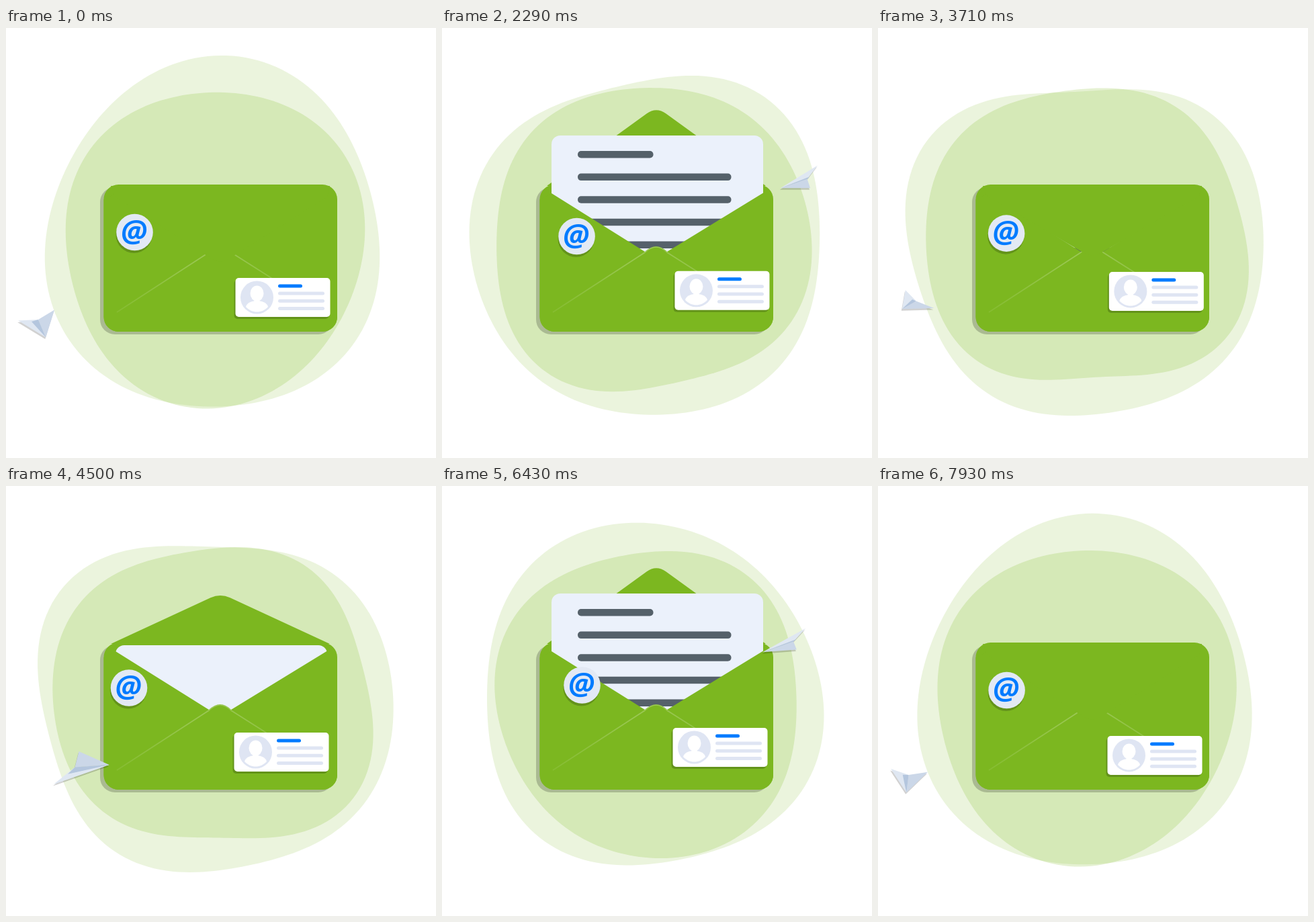
Recreate the animation shown at these times as an HTML page with a canvas. Size 640x640 px, loop 8000 ms.

```html
<!DOCTYPE html>
<html lang="en">
<head>
<meta charset="utf-8">
<title>Envelope</title>
<style>
html, body { margin: 0; width: 100%; height: 100%; overflow: hidden; background: #fff; }
canvas { display: block; width: 640px; height: 640px; }
</style>
</head>
<body>
<canvas id="stage" width="640" height="640"></canvas>
<script>
const ctx = document.getElementById('stage').getContext('2d');
const LOOP = 8000, HALF = 4000, DEG = Math.PI / 180;
const GREEN = '#7cb720', PALE = '#dfe5f3', BLUE = '#007bff', SHADE = 'rgba(0,0,0,.2)';

// Resting points of the floating badge and card, at shared times.
const stops = [0, 1430, 3000, 4500, 5290, 6430, LOOP];
const badgeStops = [[191.5, 304], [204, 310], [198, 310], [183, 300.5], [180.5, 304], [208.5, 296.5]];
const cardStops = [[341.5, 372], [345, 365], [347.5, 359.5], [339.5, 367], [346, 364], [343.5, 360]];

const cos = deg => Math.cos(deg * DEG);
const sin = deg => Math.sin(deg * DEG);
const clamp = u => Math.min(1, Math.max(0, u));
const ease = u => u < .5 ? 4 * u ** 3 : 1 - 4 * (1 - u) ** 3;
const ramp = (t, start, dur) => ease(clamp((t - start) / dur));
const mix = (p, q, u) => p.map((v, i) => v + (q[i] - v) * u);

function drift(points, time) {
  const i = stops.findIndex(s => s > time) - 1;
  const u = (time - stops[i]) / (stops[i + 1] - stops[i]);
  return mix(points[i], points[(i + 1) % points.length], (1 - cos(180 * u)) / 2);
}

function fill(path, color) {
  ctx.fillStyle = color;
  ctx.fill(path);
}

function poly(points, color) {
  const p = new Path2D();
  points.forEach(q => p.lineTo(...q));
  p.closePath();
  fill(p, color);
}

function box(x, y, w, h, r, color) {
  const p = new Path2D();
  p.roundRect(x, y, w, h, r);
  fill(p, color);
}

function oval(x, y, rx, ry, color) {
  const p = new Path2D();
  p.ellipse(x, y, rx, ry, 0, 0, 7);
  fill(p, color);
}

// A circle bent by travelling waves; the sign of lobe sets which way it sways.
function blob(size, lobe, time, color) {
  const w = 360 * time / LOOP, points = [];
  const y = 318.5 - .85 * lobe * cos(w + 15);
  for (let a = 0; a < 360; a += 2) {
    const r = size + 3 * cos(w - 140) + lobe * cos(3 * a - w - 105)
      + 7 * cos(2 * a - w + 163) + 2.5 * cos(2 * a + w - 199) + 2.3 * cos(2 * a)
      + (5.5 - 4 * cos(w)) * cos(4 * a - 150);
    points.push([309.5 + r * cos(a), y + r * sin(a)]);
  }
  poly(points, color);
}

// s runs from -1 (closed) to 1 (open).
function flap(s) {
  const lip = 235 - 17 * s, y = 235 - 107.5 * s, tip = 235 - 118 * s;
  const [left, right] = s < 0 ? [`L163 ${lip}`, `L478 ${lip}`] : ['', ''];
  fill(new Path2D(`M156 235${left}L304.5 ${y}Q319 ${tip} 333.5 ${y}${right}L482 235Z`), GREEN);
}

function letter(t) {
  const top = 237 - 77 * (ramp(t, 700, 500) - ramp(t, 2787, 500));
  box(163, top, 315, 190, [13, 13, 0, 0], '#ebf1fb');
  for (let i = 0; i < 5; i++) {
    const grown = clamp((t - 774 - 140 * i) / 200);
    if (grown) box(202, top + 23 + 33.6 * i, Math.max(10, (i ? 228.5 : 112.5) * grown), 10.5, 5, '#55616a');
  }
}

function front() {
  fill(new Path2D('M145.5 255L163 246L302 333Q319 317 335 333L478 245.5L493 255V430' +
    'A22 22 0 0 1 471 452H167.5A22 22 0 0 1 145.5 430Z'), GREEN);
  const glow = ctx.createLinearGradient(165, 0, 400, 0);
  glow.addColorStop(0, 'rgba(255,255,255,.08)');
  glow.addColorStop(.6, 'rgba(255,255,255,.25)');
  glow.addColorStop(1, 'rgba(255,255,255,.15)');
  ctx.strokeStyle = glow;
  ctx.lineWidth = 1.6;
  ctx.stroke(new Path2D('M165 423L302 334Q319 318 335 334L398 374'));
}

function badge([x, y]) {
  oval(x - 1, y + 4, 27, 27, SHADE);
  oval(x, y, 27.3, 27.3, '#e3e9f4');
  ctx.font = 'italic 700 45px "Open Sans", "Noto Sans", sans-serif';
  ctx.fillStyle = BLUE;
  const m = ctx.measureText('@');
  ctx.fillText('@', x + (m.actualBoundingBoxLeft - m.actualBoundingBoxRight) / 2,
    y + (m.actualBoundingBoxAscent - m.actualBoundingBoxDescent) / 2);
}

function card([x, y]) {
  ctx.save();
  ctx.translate(x, y);
  box(-2, 3, 141, 58, 5, SHADE);
  box(0, 0, 141, 58, 5, '#fff');
  oval(32, 29, 24.5, 24.5, PALE);
  oval(32, 23, 10, 11.5, '#fff');
  box(28, 30, 8, 9, 2, '#fff');
  fill(new Path2D('M15.5 43C17 36 26 34 32 34S47 36 48.5 43C44 48 38 50.5 32 50.5S20 48 15.5 43Z'), '#fff');
  box(63.5, 9.5, 36, 5, 2.5, BLUE);
  for (let i = 0; i < 3; i++) box(63.5, 20.5 + 11.2 * i, 69, 5, 2.5, PALE);
  ctx.restore();
}

// The plane circles the envelope, banking and foreshortened as it turns.
function plane(t) {
  const w = 360 * t / HALF, u = (t + 550) % HALF;
  const tail = [305 - 260 * cos(w - 2 - 9 * sin(2 * w)), 326 + 106 * cos(w - 17)];
  const heading = 161 - 165 * ramp(u, 0, 1050) - 41 * clamp((u - 1050) / 930) - 154 * ramp(u, 2000, 900);
  const side = heading - 90 + 42 * cos(2 * w - 81);
  const from = (angle, d) => [tail[0] + d * cos(angle), tail[1] + d * sin(angle)];

  const length = 50 + 20 * cos(2 * w - 135), span = 24 + 7 * cos(w - 54);
  const nose = from(heading, length), fold = from(heading, length * .2);
  const near = from(side, -span), far = from(side, span), keel = mix(fold, near, .3);
  const drop = ([x, y]) => [x - 1, y + 2.5];

  poly([nose, near, fold, far].map(drop), 'rgba(0,0,0,.18)');
  poly([nose, far, fold], '#cbd7e8');
  poly([nose, near, fold], '#dfe7f2');
  poly([nose, drop(keel), fold], '#b4c6de');
}

function draw(now) {
  const time = now % LOOP, t = time % HALF;
  ctx.clearRect(0, 0, 640, 640);
  blob(258, 9, time, 'rgba(124,183,32,.15)');
  blob(232, -7, time, 'rgba(124,183,32,.2)');

  const s = 2 * (ramp(t, 150, 545) - ramp(t, 3280, 550)) - 1;
  box(140, 237, 347, 219, 22, SHADE);
  box(145.5, 233, 347.5, 219, 22, GREEN);
  if (s >= 0) flap(s);
  letter(t);
  front();
  if (s < 0) flap(s);

  badge(drift(badgeStops, time));
  card(drift(cardStops, time));
  plane(t);
}

const start = performance.now();
function tick() {
  draw(performance.now() - start);
  requestAnimationFrame(tick);
}
tick();
</script>
</body>
</html>
```
